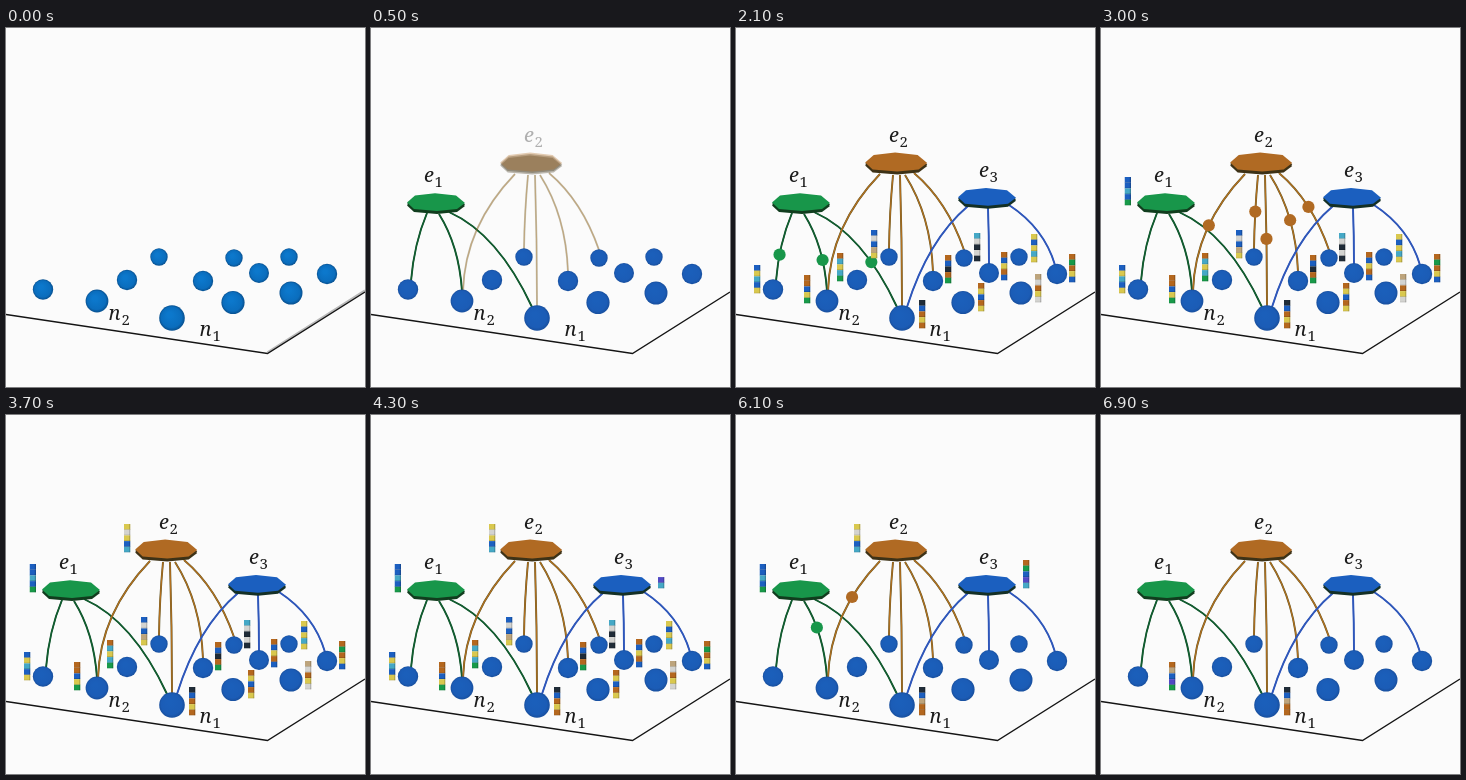
These frames come from a looping animation (359 px wide and 359 px high, 7000 ms). An HTML page with a canvas:

```html
<!DOCTYPE html>
<html lang="en">
<head>
<meta charset="utf-8">
<title>Hypergraph message passing</title>
<style>
html, body { margin: 0; width: 100%; height: 100%; overflow: hidden; background: #fbfbfb; }
canvas { display: block; width: 359px; height: 359px; }
</style>
</head>
<body>
<canvas width="359" height="359"></canvas>
<script>
const ctx = document.querySelector('canvas').getContext('2d');
const LOOP = 7000, STEP = 450;
const COLORS = {
  b: '#1c5fc0', y: '#d9c84e', o: '#b4671e', g: '#189a49', c: '#45a8c6',
  w: '#d3d3d0', t: '#bda47c', k: '#202c38', v: '#5149c4'
};

// x, y, radius, feature column left, feature column top, cells
const nodes = [
  [153, 229, 8.7, 135, 202, 'bwbty'], [228, 230, 8.7, 238, 205, 'cwkwk'],
  [283, 229, 8.7, 295, 206, 'ybycy'], [253, 245, 10, 265, 224, 'obyob'],
  [321, 246, 10.2, 333, 226, 'ogoyb'], [121, 252, 10.2, 101, 225, 'ocycg'],
  [197, 253, 10.2, 209, 227, 'obkog'], [37, 261.5, 10.2, 18, 237, 'bycby'],
  [285, 265, 11.5, 299, 246, 'twoyw'], [91, 273, 11.4, 68, 247, 'oobyg'],
  [227, 274.5, 11.6, 242, 255, 'oyboy'], [166, 290, 12.8, 183, 272, 'kboyo']
];

function makePath(d) {
  const el = document.createElementNS('http://www.w3.org/2000/svg', 'path');
  el.setAttribute('d', d);
  return { el, shape: new Path2D(d), length: el.getTotalLength() };
}

// Each link runs from the hyperedge down to the centre of a node.
const edges = [
  {
    x: 65, y: 174.5, scale: 1, fill: '#18964a', rim: '#113d1e', line: '#125f31', shade: '#10502a',
    label: ['e', '1', 53, 154], column: [23.5, 149, 'bbcbg'], shown: 100, gather: 1890,
    links: ['M56 185Q43 216 40 253L37 262', 'M68 186Q88 218 91 263V273', 'M78 184Q127 206 161 279L166 290']
  },
  {
    x: 160.2, y: 134.5, scale: 1.07, fill: '#b06a23', rim: '#3d3217', line: '#b3701f', shade: '#5d5526',
    label: ['e', '2', 153, 114], column: [118, 109, 'ywybc'], shown: 400, gather: 2760,
    links: ['M144 146Q94 198 92 263L91 273', 'M157 147Q153.500 185 153 221V229', 'M164 147Q166 212 166 277V290',
      'M169 147Q195 188 197 244V253', 'M178 145Q211 173 228 222V230']
  },
  {
    x: 251, y: 169.3, scale: 1, fill: '#1b5fbf', rim: '#143026', line: '#2f57ba', shade: '#2f57ba',
    label: ['e', '3', 243, 149], column: [287, 145, 'ogbvc'], shown: 700, gather: 3670,
    links: ['M232 178Q192 212 171 279L166 290', 'M252 180Q253 208 253 237V245', 'M273 177Q308 200 319 237L321 246']
  }
];
edges.forEach(e => e.paths = e.links.map(makePath));

// Messages sent back to a node: [edge, link] pairs, then the node's new column.
const updates = [
  { start: 5040, from: [[0, 2], [1, 2], [2, 0]], column: [183, 272, 'kbtoo'] },
  { start: 5930, from: [[0, 1], [1, 0]], column: [68, 247, 'otbvg'] }
];

const progress = (t, start, span = STEP) => Math.min(1, Math.max(0, (t - start) / span));
const ease = p => p * p * (3 - 2 * p);

function disc(x, y, r, fill) {
  ctx.fillStyle = fill;
  ctx.beginPath();
  ctx.arc(x, y, r, 0, 2 * Math.PI);
  ctx.fill();
}

function stroke(path, color, width) {
  ctx.strokeStyle = color;
  ctx.lineWidth = width;
  ctx.stroke(path);
}

function drawLabel([letter, index, x, y]) {
  ctx.fillStyle = '#1c1c1c';
  ctx.font = 'italic 20px "Noto Serif", serif';
  ctx.fillText(letter, x, y);
  ctx.font = '15px "Noto Serif", serif';
  ctx.fillText(index, x + (letter === 'n' ? 13 : 10.5), y + 4.5);
}

// A stack of cells revealed from the bottom up.
function drawColumn([x, y, cells], shown) {
  if (shown <= 0) return;
  const height = 28.5, cell = height / cells.length;
  ctx.save();
  ctx.beginPath();
  ctx.rect(x, y + height * (1 - shown), 6.5, height * shown);
  ctx.clip();
  [...cells].forEach((c, i) => {
    ctx.fillStyle = COLORS[c];
    ctx.fillRect(x, y + i * cell, 6.5, cell);
    ctx.fillStyle = 'rgba(0,0,0,.22)';
    ctx.fillRect(x + 5.3, y + i * cell, 1.2, cell);
    ctx.fillRect(x, y + (i + 1) * cell - 0.7, 6.5, 0.7);
  });
  ctx.restore();
}

function drawNode([x, y, r], glossy) {
  const g = ctx.createRadialGradient(x - r * 0.2, y - r * 0.25, r * 0.2, x, y, r);
  g.addColorStop(0, glossy ? '#0c78cc' : '#1b5fba');
  g.addColorStop(0.75, glossy ? '#0a6dbd' : '#1b5cb6');
  g.addColorStop(1, glossy ? '#08508f' : '#184f9e');
  disc(x, y, r, g);
}

function drawFloor(first) {
  if (first) stroke(new Path2D('M261.5 324.500L359 262.500'), '#b9b9b9', 2.5);
  stroke(new Path2D('M0 286.500L261.500 325.500L359 264'), '#141414', 1.4);
}

function drawPlate({ x, y, scale, fill, rim }) {
  const corners = [[-29, 0], [-21, -7], [-1, -9.3], [20, -7], [29, 0.5], [21, 6.5], [1, 8.5], [-22, 6.5]];
  for (const [color, dy] of [[rim, 3], [rim, 1.5], [fill, 0]]) {
    ctx.fillStyle = color;
    ctx.beginPath();
    corners.forEach(([dx, cy]) => ctx.lineTo(x + dx * scale, y + cy * scale + dy));
    ctx.fill();
  }
}

function drawMessage(edge, path, p) {
  const at = path.el.getPointAtLength(path.length * p);
  disc(at.x, at.y, 6.1, edge.fill);
}

function draw(t) {
  ctx.globalAlpha = 1;
  ctx.fillStyle = '#fbfbfb';
  ctx.fillRect(0, 0, 359, 359);
  drawFloor(t < 100);

  for (const e of edges) {
    ctx.globalAlpha = progress(t, e.shown, 300);
    for (const { shape } of e.paths) {
      stroke(shape, e.shade, 1.9);
      stroke(shape, e.line, 1.2);
    }
  }
  ctx.globalAlpha = 1;

  for (const e of edges) {
    const p = progress(t, e.gather);
    if (p > 0 && p < 1) e.paths.forEach(path => drawMessage(e, path, 1 - ease(p)));
  }
  for (const u of updates) {
    const p = progress(t, u.start);
    if (p > 0 && p < 1) u.from.forEach(([i, j]) => drawMessage(edges[i], edges[i].paths[j], ease(p)));
  }

  nodes.forEach(n => drawNode(n, t < 100));
  for (const e of edges) {
    ctx.globalAlpha = progress(t, e.shown, 300);
    drawPlate(e);
    drawLabel(e.label);
  }
  ctx.globalAlpha = 1;

  if (t < 4700) nodes.forEach(n => drawColumn(n.slice(3), progress(t, 1400)));
  if (t < 6380) edges.forEach(e => drawColumn(e.column, progress(t, e.gather + STEP)));
  updates.forEach(u => drawColumn(u.column, progress(t, u.start + STEP)));

  drawLabel(['n', '2', 102.5, 292]);
  drawLabel(['n', '1', 193.5, 308]);
}

const begin = performance.now();
function tick() {
  draw((performance.now() - begin) % LOOP);
  requestAnimationFrame(tick);
}
tick();
</script>
</body>
</html>
```
